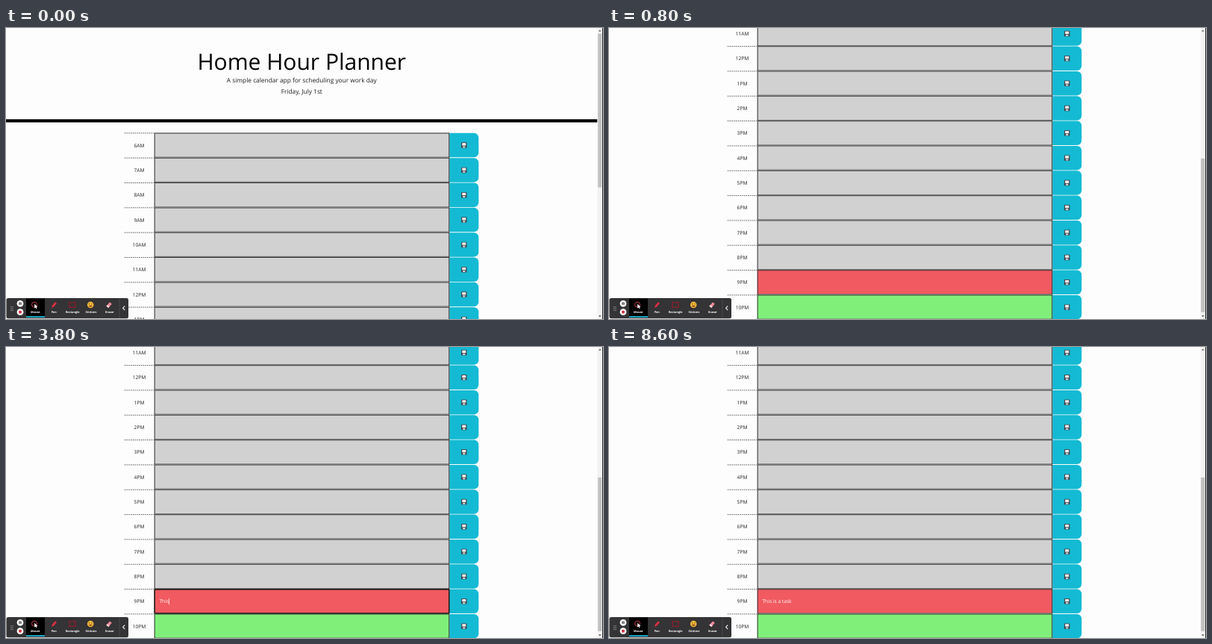
An HTML page that plays this animation: 800 px wide and 390 px high, repeating every 8700 ms.

```html
<!DOCTYPE html>
<html lang="en">
<head>
<meta charset="utf-8">
<title>Hour planner</title>
<style>
  html, body { margin: 0; width: 100%; height: 100%; overflow: hidden; background: #fefdfe; }
  svg { display: block; width: 800px; height: 390px; }
  text { font-family: "Open Sans", sans-serif; text-rendering: geometricPrecision; white-space: pre; }
  .mid { text-anchor: middle; }
  .tool { font-size: 3.8px; font-weight: 700; fill: #fff; text-anchor: middle; }
</style>
</head>
<body>
<svg viewBox="0 0 800 390">
  <g transform="scale(.416667)">
    <g id="page">
      <g class="mid" fill="#1c1c1e">
        <text x="951" y="134" font-size="72" fill="#000">Home Hour Planner</text>
        <text x="951" y="175" font-size="20">A simple calendar app for scheduling your work day</text>
        <text x="951" y="211" font-size="20">Friday, July 1st</text>
      </g>
      <rect y="293.5" width="1902" height="10"/>
      <g id="rows"></g>
      <text id="task" x="493" font-size="16" fill="#fff"></text>
      <rect id="caret" width="1.6" height="21" fill="#fff"/>
    </g>
  </g>

  <rect x="792.5" width="6.5" height="390" fill="#f3f2f3"/>
  <rect id="thumb" x="793.2" width="5" height="206" fill="#c1c1c1"/>
  <rect x="799" width="1" height="390" fill="#2a2a2a"/>
  <path d="M794 4.6l1.8-2.2 1.8 2.2z" fill="#555"/>
  <path d="M794 385.2l1.8 2.2 1.8-2.2z" fill="#555"/>

  <g id="toolbar">
    <rect x=".5" y="362" width="163.5" height="27.3" rx="2.5" fill="#343335"/>
    <path d="M6.8 373.3v6M9 373.3v6" stroke="#ccc" stroke-width="1" stroke-dasharray="1 1.4"/>
    <circle cx="19" cy="369.3" r="4.4" fill="#fff"/>
    <path d="M18 367.5v3.6M20 367.5v3.6" stroke="#222" stroke-width="1.1"/>
    <circle cx="19" cy="380.7" r="4.4" fill="#fff"/>
    <rect x="17.2" y="378.9" width="3.6" height="3.6" fill="#d22f3c"/>
    <rect x="27" y="362.5" width="25" height="25.5" fill="#000"/>
    <rect x="27" y="386.2" width="25" height="1.8" fill="#1bb5d4"/>
    <circle cx="38" cy="370.7" r="3.5" fill="none" stroke="#c93a48" stroke-width="1"/>
    <path d="M38.2 369.8v6l1.5-1.2 1 2 .9-.5-1-1.9 1.9-.2z" fill="#fff"/>
    <path d="M61 375l.8-3 4-4.8 2.2 1.8-4 4.8z" fill="#d9303f"/>
    <rect x="85" y="367.8" width="8" height="6.6" fill="none" stroke="#9c1c29" stroke-width="1.1"/>
    <circle cx="113.2" cy="371" r="4.3" fill="#f6b93b"/>
    <path d="M111.5 369.2v1.4M115 369.2v1.4" stroke="#4a3210" stroke-width=".9"/>
    <path d="M110.9 372a2.4 2.2 0 0 0 4.7 0z" fill="#7a3a18"/>
    <path d="M134.4 372.8l4.6-5.3 2.8 2.2-4.5 5.4z" fill="#f08a9b"/>
    <path d="M134.4 372.8l1.4-1.6 2.9 2.2-1.4 1.7z" fill="#f7dfe3"/>
    <path d="M152 362.5v26.3" stroke="#5a595b" stroke-width=".6"/>
    <path d="M159.2 372.7l-2.6 2.7 2.6 2.7" fill="none" stroke="#fff" stroke-width="1.1"/>
  </g>

  <path id="pointer" d="M0 0v7l1.7-1.5 1.1 2.5 1.2-.5-1.1-2.5h2.3z" fill="#fff" stroke="#222" stroke-width=".5"/>
</svg>

<script>
const $ = id => document.getElementById(id);
const LOOP = 8700, STEP = 100;
const ROW_TOP = 337, ROW_H = 80, MAX_SCROLL = 759, PAGE_H = 1696;
const NOW = 15;                       // row of the current hour
const FOCUS = [1900, 7600];
const MESSAGE = "This is a task";
const KEY_TIMES = [3500, 3600, 3700, 3800, 4100, 4300, 4500, 4900, 5100, 5400, 5500, 5600, 5700, 5800];
const POINTER = [[6700, 597, 337], [7000, 604, 327], [7400, 611, 338], [7700, 611, 338], [8300, 600, 342], [8600, 600, 342]];

const hourLabel = h => (h % 12 || 12) + (h < 12 ? "AM" : "PM");

function row(i) {
  const y = ROW_TOP + i * ROW_H;
  const color = i < NOW ? "#d1d1d1" : i === NOW ? "#f05a60" : "#80ef7a";
  return `
    <path d="M381 ${y + 1}h95" stroke="#444" stroke-width="2" stroke-dasharray="4 2.6"/>
    <text class="mid" x="428.5" y="${y + 46}" font-size="16" fill="#222">${hourLabel(i + 6)}</text>
    <path d="M1426 ${y + 1}h79a15 15 0 0 1 15 15v48a15 15 0 0 1-15 15h-79z" fill="#14bad3"/>
    <rect x="477" y="${y}" width="949" height="80" fill="${color}"/>
    <path d="M477 ${y + 78.5}h949" stroke="#777" stroke-width="3"/>
    <path d="M478 ${y + 80}v-78.8h947v78.8" fill="none" stroke="#333" stroke-width="2.4"/>
    <g transform="translate(1464 ${y + 31})">
      <rect width="18" height="18" rx="2" fill="#3d454d"/>
      <rect x="3" y="2" width="12" height="8" fill="#f6f4f4"/>
      <rect x="5" y="12" width="8" height="5" fill="#cfd6da"/>
    </g>`;
}

const nowTop = ROW_TOP + NOW * ROW_H;
$("rows").innerHTML = Array.from({ length: 17 }, (_, i) => row(i)).join("") +
  `<rect id="focus" x="478" y="${nowTop + 1.5}" width="947" height="77" rx="2" fill="none" stroke="#111" stroke-width="3"/>`;
$("toolbar").insertAdjacentHTML("beforeend",
  ["Mouse", "Pen", "Rectangle", "Stickers", "Eraser"]
    .map((name, i) => `<text class="tool" x="${39.3 + i * 24.9}" y="382">${name}</text>`).join(""));
$("task").setAttribute("y", nowTop + 46);
$("caret").setAttribute("y", nowTop + 30);

const show = (id, on) => $(id).setAttribute("visibility", on ? "visible" : "hidden");

function pointerAt(t) {
  const next = POINTER.findIndex(p => p[0] > t);
  if (next < 1) return null;
  const [t0, x0, y0] = POINTER[next - 1], [t1, x1, y1] = POINTER[next];
  const k = (t - t0) / (t1 - t0);
  return [x0 + (x1 - x0) * k, y0 + (y1 - y0) * k];
}

function draw(t) {
  const scroll = MAX_SCROLL * (1 - Math.cos(Math.PI * Math.min(1, t / 780))) / 2;
  $("page").setAttribute("transform", `translate(0 ${-scroll})`);
  $("thumb").setAttribute("y", 7.5 + scroll * 374 / PAGE_H);

  const typed = KEY_TIMES.filter(k => k <= t);
  $("task").textContent = MESSAGE.slice(0, typed.length);

  // The caret restarts its blink at the click and at every key.
  const focused = t >= FOCUS[0] && t < FOCUS[1];
  const lastInput = typed.length ? typed[typed.length - 1] : FOCUS[0];
  show("focus", focused);
  show("caret", focused && (t - lastInput) % 1000 < 500);
  $("caret").setAttribute("x", 493.5 + (typed.length ? $("task").getComputedTextLength() : 0));

  const pos = pointerAt(t);
  show("pointer", pos);
  if (pos) $("pointer").setAttribute("transform", `translate(${pos})`);
}

function tick() {
  const t = performance.now() % LOOP;
  draw(Math.floor(t / STEP) * STEP);
  requestAnimationFrame(tick);
}
tick();
</script>
</body>
</html>
```
